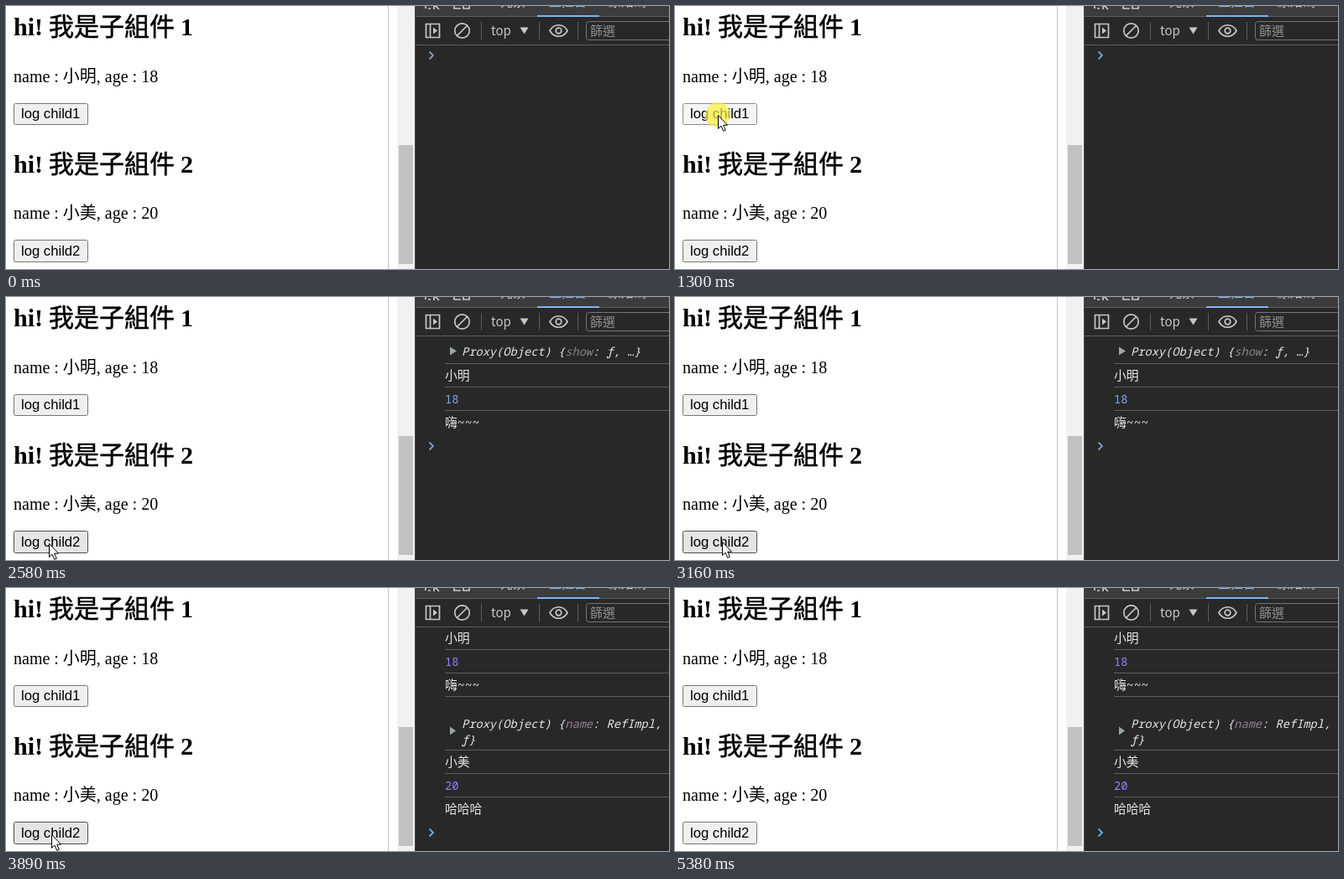
Recreate the animation shown at these times as an HTML page. Size 790 by 314 pixels, loop 6040 ms.

```html
<!DOCTYPE html>
<html lang="zh-Hant">
<head>
<meta charset="utf-8">
<title>log child</title>
<style>
  html, body { margin: 0; width: 100%; height: 100%; overflow: hidden; background: #fff; }
  svg { display: block; width: 790px; height: 314px; }
  text { white-space: pre; }
  .page { font: 300 20px "Liberation Serif", "Noto Sans CJK TC", "Noto Sans CJK", serif; }
  .page .title { font-size: 30px; font-weight: bold; word-spacing: -.5px; }
  .title tspan { font-weight: 500; stroke: #000; stroke-width: .5px; }
  .button rect { fill: #efefef; stroke: #767676; }
  .button text { font: 16.67px "Liberation Sans", sans-serif; }
  .button.hover rect { fill: #e5e5e5; stroke: #4f4f4f; }
  .button.active rect { fill: #f5f5f5; stroke: #8d8d8d; }
  #thumb { fill: #c1c1c1; }
  #thumb.hover { fill: #a8a8a8; }
  .log { font: 13.7px "Noto Sans Mono", "Noto Sans CJK TC", "Noto Sans CJK", monospace; fill: #e8e8e8; }
  .log .zh { font-size: 14.8px; }
  .log .object { font-style: italic; }
  .log path { stroke: #5e5e5e; }
  .log .arrow { fill: #9aa8a4; stroke: none; }
  .number { fill: #9980ff; }
  .first .number { fill: #84a9ee; }
  .bar { font: 15px "Noto Sans CJK TC", "Noto Sans CJK", sans-serif; fill: #c7c7c7; }
  .icon { fill: none; stroke: #c7c7c7; stroke-width: 1.7; }
</style>
</head>
<body>
<svg viewBox="0 0 790 314">
  <rect width="790" height="314" fill="#fff"/>
  <g class="page">
    <text class="title" x="9" y="35">hi! <tspan>我是子組件</tspan> 1</text>
    <text x="9" y="91">name : 小明, age : 18</text>
    <g class="button" transform="translate(0 116)">
      <rect x="9.5" y=".5" width="88" height="25" rx="2"/><text x="18" y="18">log child1</text>
    </g>
    <text class="title" x="9" y="199">hi! <tspan>我是子組件</tspan> 2</text>
    <text x="9" y="254">name : 小美, age : 20</text>
    <g class="button" transform="translate(0 279)">
      <rect x="9.5" y=".5" width="88" height="26" rx="2"/><text x="18" y="19">log child2</text>
    </g>
  </g>
  <path d="M455.5 0V314" stroke="#c4c4c4"/>
  <rect x="466" width="21" height="314" fill="#f1f1f1"/>
  <rect id="thumb" x="468" y="166" width="17" height="142"/>

  <rect x="487" width="303" height="314" fill="#282828"/>
  <g class="log" id="log">
    <path class="arrow" d="M529 25.500l8 5-8 5z"/>
    <text class="object" x="543" y="36">Proxy(Object) {<tspan fill="#858585">show</tspan>: ƒ, …}</text>
    <path d="M523 45.500H790M523 73.500H790M523 101.500H790"/>
    <text class="zh" x="523" y="64.500">小明</text>
    <text class="number" x="523" y="93">18</text>
    <text class="zh" x="523" y="120.500">嗨~~~</text>
    <g id="second">
      <path class="arrow" d="M529 165.500l7 5-7 5z"/>
      <text class="object" x="543" y="167">Proxy(Object) {<tspan fill="#957f98">name</tspan>: RefImpl,</text>
      <text class="object" x="543" y="186">ƒ}</text>
      <path d="M523 129.500H790M523 193.500H790M523 221.500H790M523 249.500H790"/>
      <text class="zh" x="523" y="213">小美</text>
      <text class="number" x="523" y="241">20</text>
      <text class="zh" x="523" y="269">哈哈哈</text>
    </g>
  </g>
  <path id="prompt" d="M504.500-4.500l4.500 4.500-4.500 4.500" fill="none" stroke-width="1.8"/>

  <rect x="488" width="302" height="46" fill="#282828"/>
  <rect x="488" width="302" height="12" fill="#3c3c3c"/>
  <path d="M488 12.500H790M488 46.500H790" stroke="#5e5e5e"/>
  <path d="M633 12H707" stroke="#7cb5f8" stroke-width="2"/>
  <path d="M487.500 0V314" stroke="#4a4a4a"/>
  <g class="bar">
    <text x="589" y="0">元素</text>
    <text x="647" y="0" fill="#7cb5f8">主控台</text>
    <text x="718" y="0">原始碼</text>
    <text x="578" y="35">top</text>
    <path d="M612.500 25.500h10l-5 8z"/>
  </g>
  <g class="icon">
    <path d="M500 0V3M503 3h3M509-3l7 7M510 4V-3M534 0V3H542M545-1h7V3h-7z"/>
    <path d="M500.500 21.500h16v16h-16zM505.500 21.500v16"/>
    <path d="M509 25.500l5 4-5 4z" fill="#c7c7c7" stroke="none"/>
    <circle cx="543.5" cy="29.500" r="8.700"/><path d="M537.500 35.500l12-12"/>
    <path d="M648 29.500C653 20.500 664 20.500 669 29.500C664 38.500 653 38.500 648 29.500z"/>
    <circle cx="658.500" cy="29.500" r="3.300"/>
  </g>
  <path d="M566.500 19V40M635.500 19V40M681.500 19V40" stroke="#5e5e5e"/>
  <rect x="691.500" y="18.500" width="110" height="22" rx="3" fill="#282828" stroke="#757575"/>
  <text class="bar" x="696" y="35" style="fill:#8f8f8f">篩選</text>

  <g id="cursor">
    <circle id="press" r="15" fill="#f7ef3a" fill-opacity=".7"/>
    <path d="M.5.500V16.500L4 13.200L6.700 19.300L9.300 18.200L6.700 12.200H11.500z" fill="#fff" stroke="#000"/>
  </g>
</svg>
<script>
const LOOP = 6040, STEPS = 8;
const $ = id => document.getElementById(id);
const buttons = [...document.querySelectorAll('.button')];
const track = [];
const hold = (t, x, y) => track.push({ t, x, y });

// Stepped cubic path on a 10 ms clock; lead = 1 leaves the resting point at once.
function glide(t0, t1, lead, ...points) {
  for (let i = 0; i <= STEPS; i++) {
    const u = (i + lead) / (STEPS + lead), v = 1 - u;
    const weights = [v * v * v, 3 * v * v * u, 3 * v * u * u, u * u * u];
    const at = axis => Math.round(points.reduce((sum, p, k) => sum + p[axis] * weights[k], 0));
    const t = t0 + (t1 - t0) * i / STEPS;
    hold(Math.floor(t / 10) * 10, at(0), at(1));
  }
}

glide(200, 760, 0, [492, 224], [330, 130], [60, 32], [50, 121]);
hold(830, 50, 127);
hold(890, 51, 130);
glide(1890, 2440, 1, [51, 130], [188, 140], [188, 262], [51, 267]);
hold(2510, 50, 285);
hold(2580, 51, 294);
hold(2650, 48, 294);
hold(2720, 45, 293);
hold(2920, 50, 293);
hold(2990, 55, 293);
hold(3160, 56, 292);
hold(3830, 54, 294);
glide(4220, 4760, 1, [54, 294], [60, 310], [423, 296], [519, 217]);
hold(4830, 533, 208);
hold(4900, 540, 203);
hold(5300, 587, 264);

const show = (el, on) => el.setAttribute('visibility', on ? 'visible' : 'hidden');
const move = (el, x, y) => el.setAttribute('transform', `translate(${x} ${y})`);
const between = (v, a, b) => v >= a && v < b;

function draw(now) {
  const t = now % LOOP;
  const pose = track.findLast(p => p.t <= t);
  const visible = !!pose && t < 5380;
  const { x, y } = visible ? pose : { x: -50, y: -50 };
  const pressed = between(t, 1300, 1430) || between(t, 3760, 3890);
  const stage = t < 1430 ? 0 : t < 3890 ? 1 : 2;

  show($('cursor'), visible);
  show($('press'), visible && pressed);
  move($('cursor'), x, y);
  buttons.forEach((button, i) => {
    const over = between(x, 9, 98) && between(y, [116, 279][i], [142, 306][i]);
    button.classList.toggle('hover', over && !pressed);
    button.classList.toggle('active', over && pressed);
  });
  $('thumb').classList.toggle('hover', between(x, 468, 485) && between(y, 166, 308));

  show($('log'), stage > 0);
  show($('second'), stage > 1);
  $('log').classList.toggle('first', stage === 1);
  move($('log'), 0, stage === 1 ? 34 : 0);
  move($('prompt'), 0, [59, 178, 292][stage]);
  $('prompt').setAttribute('stroke', stage === 2 ? '#5fb3e8' : '#7f9fc8');
}

const start = performance.now();
function frame() {
  draw(performance.now() - start);
  requestAnimationFrame(frame);
}
frame();
</script>
</body>
</html>
```
